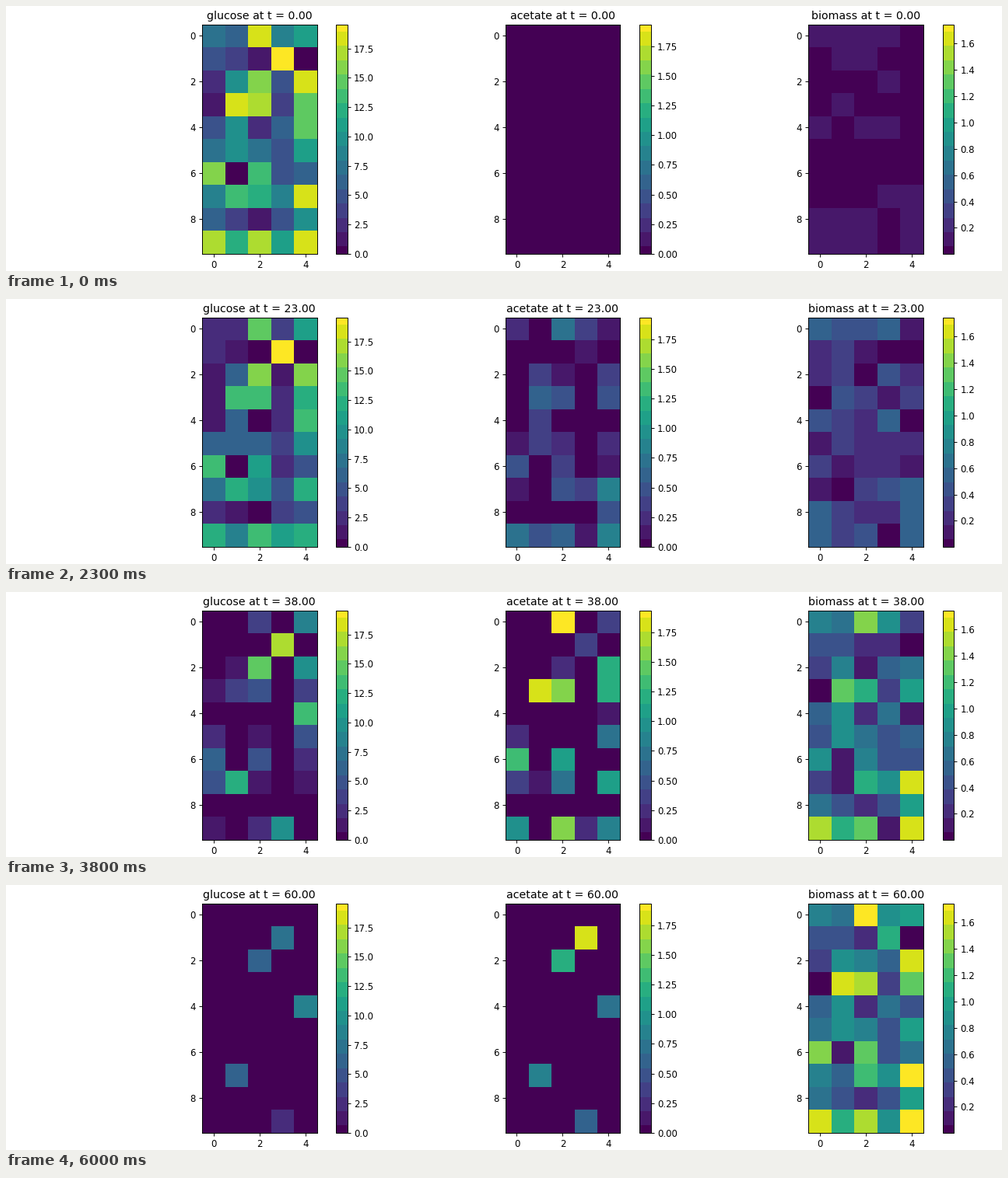
A matplotlib script that plays this animation: 1280 px wide and 341 px high, repeating every 6.1 s.

```python
import numpy as np
import matplotlib.pyplot as plt
from matplotlib.animation import FuncAnimation
from matplotlib.colors import ListedColormap

W, H, DPI = 1280, 341, 100
STEPS, SUB = 61, 10
ROWS, COLS = 10, 5
CELL = 29.5
TOP = 23.7

plt.rcParams.update({
    "font.family": "DejaVu Sans",
    "axes.linewidth": 0.68,
    "axes.titlesize": 10.2,
    "axes.titlepad": 5.1,
    "xtick.labelsize": 8.5, "ytick.labelsize": 8.5,
    "xtick.major.size": 2.98, "ytick.major.size": 2.98,
    "xtick.major.width": 0.68, "ytick.major.width": 0.68,
    "xtick.major.pad": 2.98, "ytick.major.pad": 2.98,
})

# Starting concentrations in each cell of the grid
GLUCOSE = np.array([
    7.4, 6.4, 18.7, 9.0, 11.3,
    5.0, 4.0, 0.9, 19.55, 0.05,
    2.9, 9.2, 15.8, 4.95, 18.0,
    0.9, 18.0, 17.0, 3.2, 14.8,
    5.2, 9.2, 1.85, 6.4, 14.2,
    7.7, 9.2, 7.7, 5.0, 11.3,
    15.8, 0.3, 14.0, 4.4, 6.6,
    9.0, 12.9, 12.8, 8.7, 18.1,
    6.6, 4.2, 0.9, 5.0, 10.2,
    17.0, 11.7, 17.0, 11.3, 18.1]).reshape(ROWS, COLS)
BIOMASS = np.array([
    95, 90, 69, 89, 14.5,
    50, 77, 95, 9, 8,
    50, 52, 7, 95, 34,
    6, 65, 54, 33, 51,
    97, 58, 90, 97, 4.2,
    27, 54, 39, 41, 30,
    46, 55, 42, 46, 27,
    19.5, 5.2, 58.5, 74, 87,
    98, 85, 100, 36, 96,
    82, 64, 66, 8.5, 89]).reshape(ROWS, COLS) / 1000


def simulate():
    """Monod glucose uptake with acetate overflow and later re-uptake."""
    g, a, b = GLUCOSE.copy(), np.zeros((ROWS, COLS)), BIOMASS.copy()
    dt = 0.1 / SUB
    states = []
    for _ in range(STEPS):
        states.append((g.copy(), a.copy(), b.copy()))
        for _ in range(SUB):
            uptake = 10 * g / (1 + g)
            overflow = np.maximum(uptake - 7.9, -5)
            dg = np.minimum(uptake * b * dt, g)
            da = np.maximum(overflow * b * dt, -a)
            g, a, b = g - dg, a + da, b + 0.0885 * dg - 0.023 * da
    return states


def banded(levels=16):
    """Viridis in flat bands, each value taking its nearest level."""
    viridis = plt.get_cmap("viridis")
    return ListedColormap([viridis((j + 1) // 2 / levels)
                           for j in range(2 * levels)])


def box(x, w):
    h = CELL * ROWS
    return fig.add_axes([x / W, 1 - (TOP + h) / H, w / W, h / H])


def panel(x, vmin, vmax, ticks, fmt):
    ax = box(x, CELL * COLS)
    im = ax.imshow(np.zeros((ROWS, COLS)), cmap=cmap, vmin=vmin, vmax=vmax,
                   aspect="auto", interpolation="nearest")
    ax.set_xticks([0, 2, 4])
    ax.set_yticks([0, 2, 4, 6, 8])
    fig.colorbar(im, cax=box(x + 172.1, CELL / 2), ticks=ticks, format=fmt)
    return ax, im


states = simulate()
cmap = banded()
fig = plt.figure(figsize=(W / DPI, H / DPI), dpi=DPI, facecolor="white")
names = ["glucose", "acetate", "biomass"]
panels = [
    panel(252.0, 0, 19.55, np.arange(0, 18, 2.5), "%.1f"),
    panel(641.7, 0, 1.937, np.arange(0, 1.8, 0.25), "%.2f"),
    panel(1031.4, 0.0045, 1.741, np.arange(1, 9) * 0.2, "%.1f"),
]


def update(i):
    for (ax, im), name, data in zip(panels, names, states[i]):
        im.set_data(data)
        ax.set_title(f"{name} at t = {i:.2f}")
    return [im for _, im in panels]


anim = FuncAnimation(fig, update, frames=STEPS, interval=100,
                     repeat=True, repeat_delay=0, blit=False)
plt.show()
```
